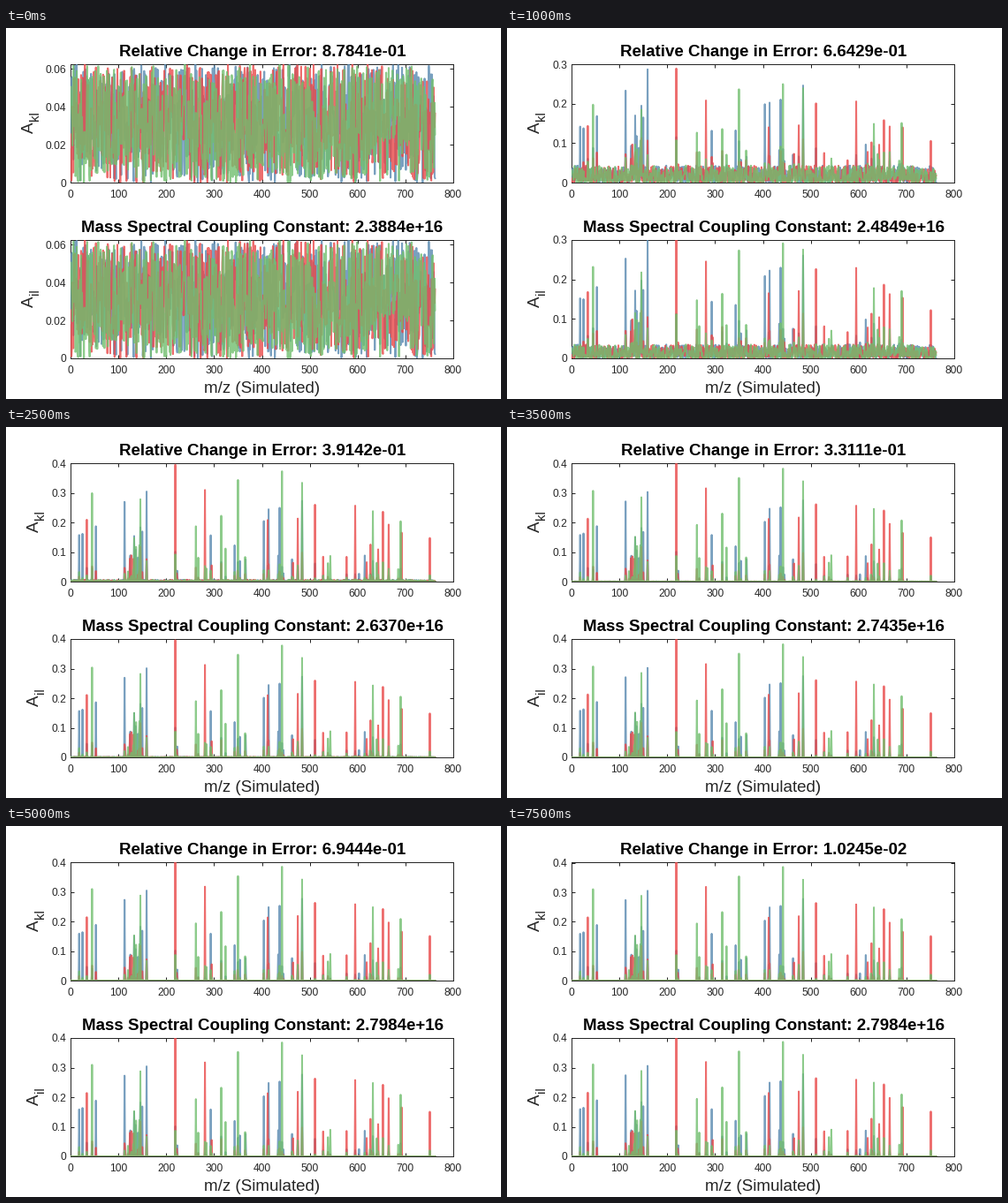
A matplotlib script for the animation above (8000 ms loop, 560x420 px).

```python
import numpy as np
import matplotlib.pyplot as plt
from matplotlib.animation import FuncAnimation
from matplotlib.ticker import FuncFormatter

W, H, DPI = 560, 420, 80
FRAMES, INTERVAL = 16, 500
LAST_MZ = 762
PT = 72 / DPI  # points per pixel
GRAY = "0.15"
COLORS = [(0.347, 0.536, 0.691), (0.915, 0.282, 0.288), (0.442, 0.749, 0.432)]
BIG, SMALL = 18.75, 12  # font sizes in pixels

plt.rcParams.update({
    "font.family": "Liberation Sans",
    "path.simplify": False,
    "axes.linewidth": PT,
    "axes.edgecolor": GRAY,
})

# Strongest peaks of each component; weaker ones are seeded
MAIN = [
    {18: .16, 25: .165, 53: .19, 113: .275, 150: .17, 159: .30, 293: .16,
     404: .205, 414: .25, 437: .255, 484: .22},
    {34: .216, 219: .405, 281: .32, 412: .215, 475: .22, 511: .265,
     595: .26, 653: .244, 665: .198, 692: .167, 751: .152},
    {45: .312, 146: .277, 262: .195, 315: .234, 350: .356, 442: .388,
     484: .293, 632: .25, 690: .21},
]
RISE = np.array([[1.6], [2.2], [2.6]])  # steps each component takes to appear
ERRORS = {0: .87841, 1: 1, 3: .44128, 5: .39142, 7: .33111, 10: .69444,
          15: .010245}

rng = np.random.default_rng(7)
mz = np.arange(1, LAST_MZ + 1)


def component(main):
    y = np.zeros(LAST_MZ)
    spots = np.r_[rng.normal(140, 17, 6), rng.uniform(220, 700, 9)].astype(int)
    y[spots] = rng.uniform(0.02, 0.13, spots.size)
    for pos, height in main.items():
        y[pos - 1] = height
    return y


own = np.array([component(m) for m in MAIN])
total = own.sum(axis=0)
peaks = own + rng.uniform(0, 0.3, own.shape) * (total - own)
noise = rng.random(own.shape)


def signals(k, pace):
    """Peaks grow out of the noise; `pace` below 1 runs ahead."""
    gain = 1 - np.exp(-(k / (RISE * pace)) ** 1.7)
    settle = 1 - 0.06 * np.exp(-k / 5)
    crosstalk = 0.4 * gain * (1 - gain)
    hiss = 0.0625 * np.exp(-(k / (3.3 * pace)) ** 2) * noise ** (1 + 0.3 * k)
    return gain * settle * peaks + crosstalk * total + hiss


fig = plt.figure(figsize=(W / DPI, H / DPI), dpi=DPI, facecolor="white")


def label(x, y, s, px, **kw):
    kw = {"color": GRAY, "va": "baseline", **kw}
    return fig.text(x / W, 1 - y / H, s, fontsize=px * PT, **kw)


class Panel:
    def __init__(self, top, sub, sub_len, pace, limits):
        self.pace, self.limits = pace, limits
        left, right, height = 73, 506, 134
        self.ax = ax = fig.add_axes(
            [left / W, 1 - (top + height) / H, (right - left) / W, height / H])
        ax.set_xlim(0, 800)
        ax.set_xticks(range(0, 801, 100))
        ax.set_axisbelow(True)
        ax.tick_params(direction="in", top=True, right=True, length=4.3 * PT,
                       width=PT, color=GRAY, labelcolor=GRAY, labelsize=SMALL * PT)
        ax.tick_params(axis="x", pad=8 * PT)
        ax.tick_params(axis="y", pad=5 * PT)
        ax.yaxis.set_major_formatter(FuncFormatter(lambda v, _: f"{v:g}"))
        for spine in ax.spines.values():
            spine.set_zorder(0.6)
        self.lines = [ax.plot([], [], color=c, alpha=0.8, lw=2 * PT,
                              solid_joinstyle="round")[0] for c in COLORS]
        self.title = label(290, top - 9, "", BIG, color="black",
                           ha="center", weight="bold")
        # Rotated "A" with its subscript, centred on the axis
        start = top + height / 2 + (11 + sub_len) / 2
        turned = dict(rotation=90, rotation_mode="anchor", ha="left")
        self.name = [label(0, start, "A", BIG, **turned),
                     label(0, start - 13.5, sub, 0.8 * BIG, **turned)]

    def update(self, k, title):
        hi = np.interp(k, list(self.limits), list(self.limits.values()))
        step = 0.02 if hi < 0.1 else 0.05 if hi < 0.25 else 0.1
        self.ax.set_ylim(0, hi)
        self.ax.set_yticks(np.arange(0, hi + 1e-9, step))
        for line, y in zip(self.lines, signals(k, self.pace)):
            line.set_data(mz, y)
        self.title.set_text(title)
        x = 37 if step == 0.1 else 30.5  # follows the width of the tick labels
        for text, dx in zip(self.name, (0, 6)):
            text.set_x((x + dx) / W)


upper = Panel(41, "kl", 10.8, 1.0, {0: .0625, 1: .156, 2: .3, 3: .4, 11: .4, 15: .403})
lower = Panel(240, "il", 6.7, 0.8, {0: .0625, 1: .212, 2: .3, 3: .4})
label(290, 413, "m/z (Simulated)", BIG, ha="center")


def update(k):
    error = np.exp(np.interp(k, list(ERRORS), np.log(list(ERRORS.values()))))
    coupling = 2.38837e16 * 1.02 ** min(k, 8)
    upper.update(k, f"Relative Change in Error: {error:.4e}")
    lower.update(k, f"Mass Spectral Coupling Constant: {coupling:.4e}")
    return []


anim = FuncAnimation(fig, update, frames=FRAMES, interval=INTERVAL,
                     init_func=lambda: update(0), repeat=True, repeat_delay=0)
plt.show()
```
